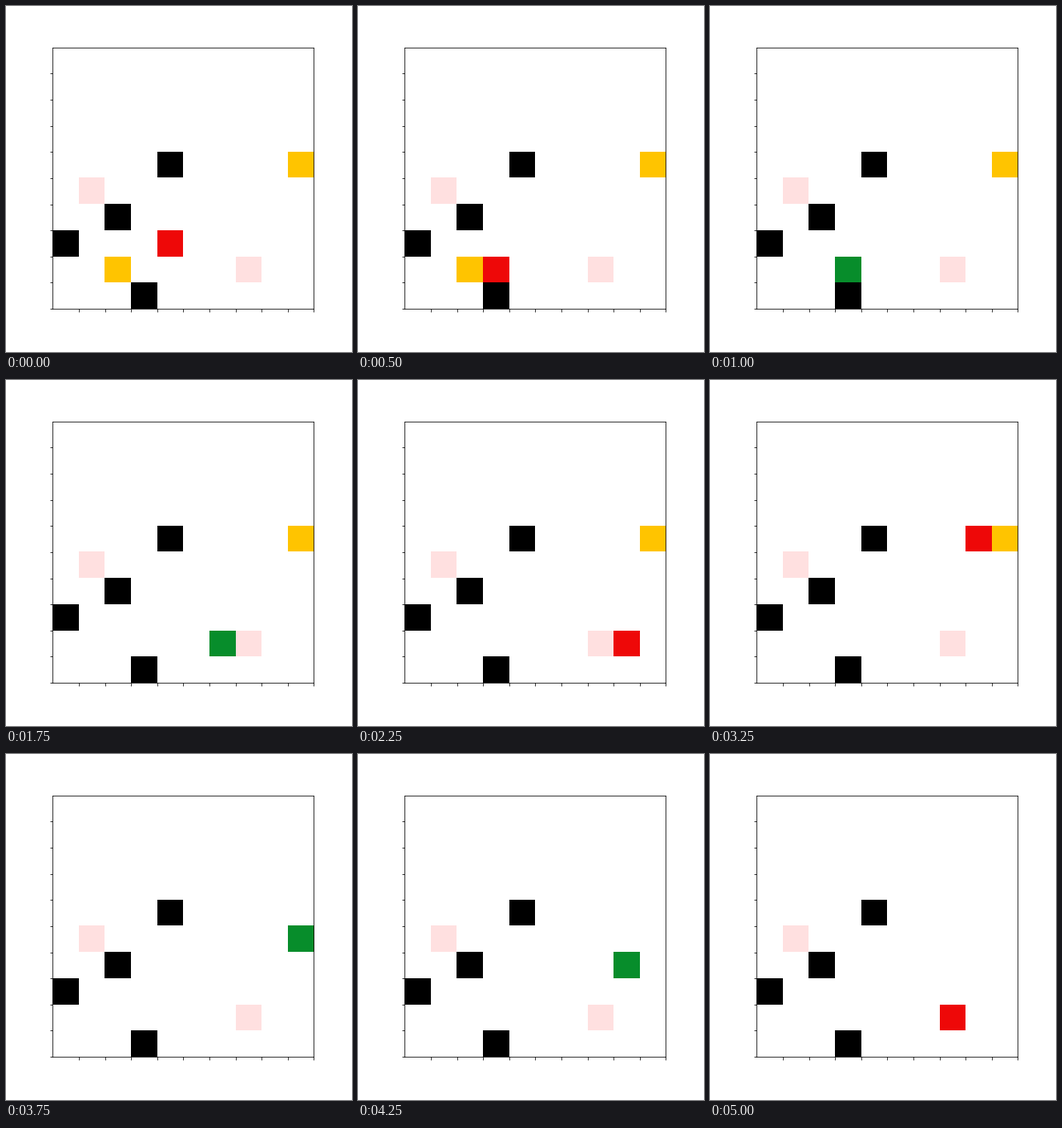
Write a matplotlib script that moves like this. It is 432 px wide and 432 px high and loops after 5250 ms.

```python
import numpy as np
import matplotlib.pyplot as plt
from matplotlib.animation import FuncAnimation
from matplotlib.colors import to_rgb

N = 10
STEP_MS = 250

WHITE, WALL, GOAL, ITEM, EMPTY, LOADED = map(
    to_rgb, ("#ffffff", "#000000", "#ffe0e0", "#ffc400", "#ee0808", "#078d2b"))

WALLS = [(4, 4), (2, 6), (0, 7), (3, 9)]
GOALS = [(1, 5), (7, 8)]
ITEMS = [(2, 8), (9, 4)]
START = (4, 7)
MOVES = "DLLRRRRRRUUUURDDLDLD"
DELTA = {"U": (0, -1), "D": (0, 1), "L": (-1, 0), "R": (1, 0)}


def simulate():
    """Return (position, loaded, remaining items) for every step."""
    pos, loaded, items = START, False, list(ITEMS)
    states = [(pos, loaded, tuple(items))]
    for move in MOVES:
        # a detour around the drop-off cell after the first delivery
        dx, dy = DELTA[move]
        pos = (pos[0] + dx, pos[1] + dy)
        if pos in items and not loaded:
            items.remove(pos)
            loaded = True
        elif pos in GOALS:
            loaded = False
        states.append((pos, loaded, tuple(items)))
    return states


def render(state):
    pos, loaded, items = state
    grid = np.ones((N, N, 3))
    for cells, color in ((WALLS, WALL), (GOALS, GOAL), (items, ITEM)):
        for x, y in cells:
            grid[y, x] = color
    grid[pos[1], pos[0]] = LOADED if loaded else EMPTY
    return grid


states = simulate()

fig = plt.figure(figsize=(6, 6), dpi=72, facecolor="white")
fig.subplots_adjust(left=0.125, right=0.9, bottom=0.125, top=0.88)
ax = fig.add_subplot()
image = ax.imshow(render(states[0]), interpolation="nearest")
edges = np.arange(0.5, N)
ax.set_xticks(edges)
ax.set_yticks(edges)
ax.tick_params(labelbottom=False, labelleft=False)


def update(i):
    image.set_data(render(states[i]))
    return [image]


anim = FuncAnimation(fig, update, frames=len(states), init_func=lambda: update(0),
                     interval=STEP_MS, repeat=True, repeat_delay=0, blit=False)
plt.show()
```
